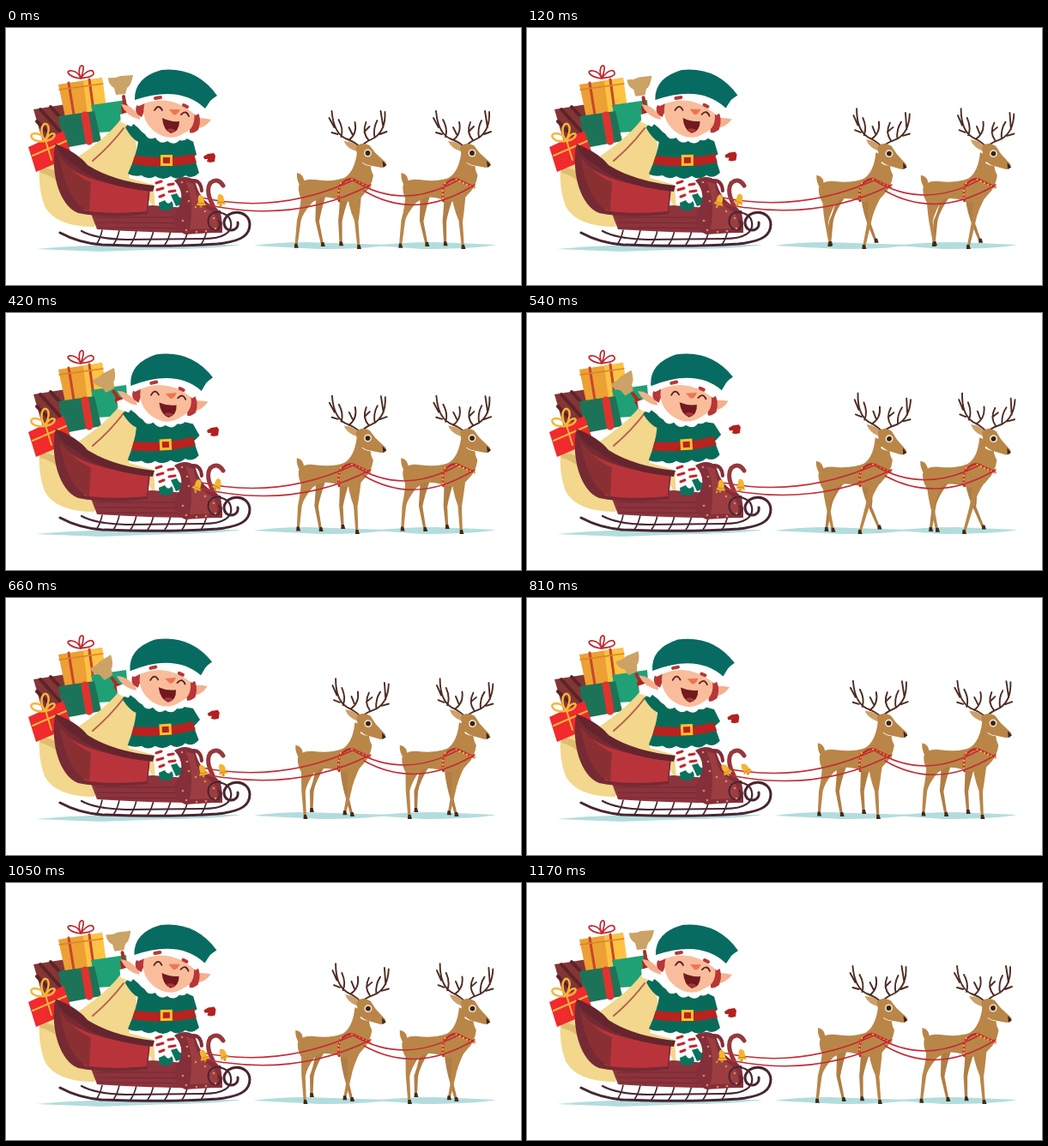
Write an HTML page that moves like this. It is 600 by 300 pixels and loops after 1.2 s.

```html
<!DOCTYPE html>
<html lang="en">
<meta charset="utf-8">
<title>Sleigh ride</title>
<style>
html, body { margin: 0; height: 100%; overflow: hidden; background: #fff; }
svg { display: block; width: 100vw; height: 100vh; }
.line { fill: none; stroke-linecap: round; stroke-linejoin: round; }
</style>
<svg viewBox="0 0 600 300">
  <g fill="#b3dddd">
    <path d="M35 258Q90 253 150 253L274 253Q250 257 190 258L110 261Z"/>
    <path d="M288 254Q315 250 350 250L445 253Q425 258 365 258Z"/>
    <path d="M430 254Q460 250 500 250L571 253Q545 258 485 258Z"/>
  </g>

  <!-- sack and presents -->
  <path fill="#f2d78c" d="M39 160Q37 187 45 208Q58 232 103 232L112 200L62 155Z"/>
  <path fill="#dfbd70" d="M39 163Q55 163 64 172L68 188Q56 172 40 169Z"/>
  <path fill="#843536" d="M32 95L70 89L78 125L43 133Z"/>
  <path class="line" stroke="#5c2427" stroke-width="4" d="M40 95L66 124M52 92L74 116M36 109L56 129"/>
  <path fill="#eda033" d="M61 66L112 58L117 96L69 104Z"/>
  <path fill="#ffc343" d="M90 62L112 58L117 96L95 100Z"/>
  <path class="line" stroke="#c8452c" stroke-width="3" d="M73 64L79 101M97 60L102 96"/>
  <path class="line" stroke="#d98425" stroke-width="1.500" d="M62 72L113 65"/>
  <path class="line" stroke="#c1272d" stroke-width="1.700" d="M87 59C72 57 68 49 77 50C84 51 86 56 87 59C83 48 87 41 90 45C91 50 88 55 87 59C95 47 103 48 102 54C98 59 91 57 87 59"/>
  <path fill="#20a075" d="M99 90L140 84L143 120L106 122Z"/>
  <path fill="#1d7357" d="M61 103L103 97L111 132L68 140Z"/>
  <path class="line" stroke="#e03330" stroke-width="9" d="M92 102L97 132"/>
  <path fill="#f02a2d" d="M26 139L67 120L77 150L35 168Z"/>
  <path class="line" stroke="#f5b63c" stroke-width="2" d="M46 131L53 154M31 149L70 132"/>
  <path class="line" stroke="#f5b63c" stroke-width="2.500" d="M45 132C30 134 25 124 33 123C40 123 44 127 45 132C38 119 43 110 47 112C52 115 49 126 45 132C53 119 60 123 55 128C53 131 49 131 45 132"/>
  <path fill="#f2d78c" d="M80 153Q118 128 134 106L150 118L153 150L143 175L172 183L174 213L164 196Q110 180 80 153Z"/>
  <path class="line" stroke="#b95d4c" stroke-width="2" d="M101 155Q122 137 137 117"/>

  <!-- runners -->
  <g class="line" stroke="#482531" stroke-width="3">
    <path d="M63 239Q85 251 112 253Q190 256 246 252C276 249 284 241 284 229C283 211 256 211 254 227C254 240 272 238 270 227"/>
    <path stroke-width="2.200" d="M88 237Q104 246 140 247L230 246C254 246 264 238 262 227C260 212 236 212 235 227C236 240 252 239 251 228Q248 222 243 226"/>
    <path id="struts" stroke-width="1.600"/>
  </g>

  <!-- sleigh -->
  <path fill="#8d333c" d="M98 214L170 207L250 213L252 239Q180 240 106 235Z"/>
  <path class="line" stroke="#702b35" stroke-width="1.200" d="M105 221L245 221M106 227L250 228M108 233L250 234"/>
  <path fill="#762a34" d="M57 137C52 170 62 207 84 216Q120 223 165 217L168 187Q110 184 82 159Q69 151 57 137Z"/>
  <path fill="#b9343a" d="M69 159Q92 181 166 189L164 214Q120 218 91 213Q84 192 69 159Z"/>
  <path fill="#8a3033" d="M62 150Q82 174 99 180L97 214Q72 206 62 150Z"/>
  <path fill="#65252f" d="M57 135Q83 145 95 160Q125 179 173 184L171 191Q109 185 82 161Q63 151 57 135Z"/>

  <!-- legs -->
  <path class="line" stroke="#fff" stroke-width="6" d="M177 174L182 202M191 174L195 198"/>
  <path class="line" stroke="#c1272d" stroke-width="3" d="M175 181L181 179M176 189L183 187M179 197L184 195M189 183L195 182M190 191L197 190"/>
  <path fill="#08745d" d="M178 204L185 201Q189 208 193 202Q198 210 189 213L179 212ZM192 195L199 193Q203 201 206 197Q209 205 198 208Z"/>

  <g id="ringer">
    <path fill="#cba366" d="M119 58Q127 59 133 56L148 55Q146 67 141 70L139 77L128 78L126 70Q119 66 119 58Z"/>
    <path class="line" stroke="#a33128" stroke-width="4" d="M137 80L139 94"/>
    <path fill="#b3221f" d="M134 90Q139 84 143 92L143 101L135 101Z"/>
  </g>

  <path id="sleeve" fill="#086b59" d="M203 126L218 130L225 144L216 152L203 148Z"/>
  <path id="mitten" fill="#b3211f" d="M-7 -2L-2 -5L5 -6L7 -3L6 4L1 5L-3 4L-2 1L-6 1Z"/>

  <g id="elf">
    <path fill="#086b59" d="M145 109Q156 118 167 128L210 128Q218 145 225 169Q217 177 209 172Q200 179 192 173Q183 179 174 173Q165 178 158 172Q149 174 142 170Q152 148 154 133Q146 129 139 116Z"/>
    <path fill="#b9221f" d="M150 149Q187 154 219 147L222 157Q186 165 147 159Z"/>
    <rect x="181.500" y="149.500" width="11" height="10" fill="#b9221f" stroke="#ffc02e" stroke-width="3"/>
    <path fill="#fff" d="M133 101L146 97L152 108L146 115L134 110ZM151 107Q154 120 162 124Q166 132 174 128Q180 137 188 132Q196 138 202 131Q210 133 213 126Q225 122 224 106Z"/>
    <path fill="#f4b08d" d="M156 104Q146 89 134 89Q140 103 156 107ZM222 105Q232 105 239 107Q231 118 219 117Z"/>
    <path fill="#b93636" d="M155 86Q146 98 158 104L166 87ZM222 96Q229 105 224 119Q217 124 214 122L214 98Z"/>
    <path fill="#f9bd9b" d="M162 86Q190 74 219 97Q222 117 207 123Q190 134 172 120Q156 106 162 86Z"/>
    <path fill="#fff" d="M152 83Q186 63 230 91Q228 99 221 102Q190 74 155 91Q149 90 152 83Z"/>
    <path fill="#086b61" d="M150 84Q149 58 181 49Q222 45 246 79Q241 82 238 85L232 94Q203 66 150 84Z"/>
    <path class="line" stroke="#b93636" stroke-width="4" d="M174 82L180 81M207 90L211 92"/>
    <path class="line" stroke="#5a2325" stroke-width="1.800" d="M173 96Q178 88 182 96M204 101Q210 95 213 103"/>
    <path fill="#ef7552" d="M190 95L203 95Q199 103 195 101Z"/>
    <path fill="#70191f" d="M182 105Q192 110 202 109Q202 121 192 123Q183 119 182 105Z"/>
    <path fill="#a83538" d="M187 119Q192 115 198 120Q193 124 187 119Z"/>
  </g>

  <!-- sleigh front -->
  <path fill="#842f39" d="M196 178Q209 170 220 178Q226 202 242 208Q253 213 252 238L209 241Q190 233 199 213Q211 194 196 178Z"/>
  <path fill="#9c3e41" d="M209 179L219 182Q222 205 238 213Q247 218 246 234L214 235Q220 200 209 179Z"/>
  <path class="line" stroke="#97383b" stroke-width="5" d="M241 207Q232 190 238 181Q247 174 253 184"/>
  <path class="line" stroke="#842c36" stroke-width="4" d="M218 178Q227 178 228 190"/>
  <path class="line" stroke="#482531" stroke-width="2" d="M250 215C239 213 234 221 236 229Q239 237 247 235Q252 230 248 225"/>
  <g id="studs" fill="#dc8a5b"></g>

  <g id="deer">
    <g id="farLegs"></g>
    <g id="torso" fill="#b98648">
      <path d="M347 181Q348 171 339 169Q338 177 343 185Z"/>
      <path d="M341 184Q345 175 360 177Q380 180 394 175Q406 168 409 145L426 152Q423 163 428 172Q426 186 416 195Q409 205 392 202Q376 196 366 198Q352 208 346 203Q340 194 341 184Z"/>
      <path class="line" stroke="#fff" stroke-width="2" d="M416 157Q421 161 428 160"/>
    </g>
    <g id="nearLegs"></g>
    <g id="head">
      <g class="line" stroke="#4d2b22" stroke-width="1.900">
        <path d="M412 138Q405 132 396 129Q382 122 380 97M383 116L377 105M387 124L380 122M391 127Q394 118 388 107M400 131Q410 123 407 110M404 124L400 116"/>
        <path d="M415 137Q421 132 430 128Q443 119 442 98M440 116L437 97M436 124L444 121M430 128Q428 117 433 108M423 131Q415 122 420 110M418 121L424 115"/>
      </g>
      <path fill="#cda06a" d="M411 138Q404 132 394 132Q398 141 409 144Z"/>
      <path fill="#b98648" d="M408 139Q414 132 424 137L431 146L443 157Q445 162 438 163L422 160Q410 157 408 139Z"/>
      <path fill="#382522" d="M439 155L444 160L440 163Z"/>
      <circle cx="422" cy="146" r="4.500" fill="#f4e6c8"/>
      <circle cx="422" cy="146" r="2.900" fill="#332320"/>
    </g>
    <g class="line" stroke="#c4272f" stroke-width="2.500">
      <path d="M390 181Q386 191 388 202M390 183Q400 172 409 179L424 186"/>
      <path stroke="#f0b23e" stroke-width="2.200" stroke-dasharray=".5 4" d="M390 181Q386 191 388 202M403 177L425 187"/>
    </g>
  </g>
  <use href="#deer" x="121.500"/>

  <path id="reins" class="line" stroke="#c32b36" stroke-width="1.500"/>
  <g id="bells"></g>
</svg>
<script>
const $ = id => document.getElementById(id);
const TAU = Math.PI * 2, rad = d => d * Math.PI / 180;
const FRAME = 30, LOOP = 1200, SWING = 1170, STRIDE = 390;

$('struts').setAttribute('d', [112, 132, 152, 172, 192, 212, 234]
  .map(x => `M${x} 236Q${x - 2} 246 ${x - 7} 253`).join(''));

$('studs').innerHTML = [[205, 180], [211, 191], [213, 202], [221, 209], [232, 214],
  [242, 222], [244, 234], [233, 237], [222, 238], [210, 236], [206, 225]]
  .map(([x, y]) => `<circle cx="${x}" cy="${y}" r="1.3"/>`).join('');

// hip x, hip half width, stride centre, reach, phase of the furthest step, knee offset
const farLegs = [[367, 6, 358, 11, 350, -5], [395, 6, 401, 11, 170, -3]];
const nearLegs = [[355, 11, 347.5, 10, 165, -5], [406, 8, 398, 13, 355, 0]];

function leg([hip, width, cx, reach, peak, bend], phase, ground, color) {
  const a = phase - rad(peak);
  const x = cx + reach * Math.cos(a), y = ground - 5 * Math.max(0, -Math.sin(a));
  const knee = (hip + x) / 2 + bend;
  return `<path fill="${color}" d="M${hip - width} 192Q${hip - width} 206 ${knee - 2.5} 225L${x - 1.5} ${y}H${x + 1.5}
    L${knee + 2} 226Q${knee + 4} 214 ${hip + width} 194Z"/>
    <path fill="#40291f" d="M${x - 1.5} ${y - 4}h3l1.500 5h-5Z"/>`;
}

const bell = (x, y, angle) => `<g transform="translate(${x} ${y}) rotate(${angle})">
  <path fill="#f3b531" d="M-2 3Q4 2 4 11L6 15H-5L-3 11Q-4 5 -2 3Z"/>
  <path fill="#c98525" d="M-4 12H5V13H-4Z"/><circle cy="16" r="1.600" fill="#d99428"/></g>`;

function draw(t) {
  const a = TAU * t / SWING, back = (1 - Math.cos(a)) / 2;
  const phase = TAU * t / STRIDE, lift = (1 - Math.cos(phase)) / 2;
  const move = (id, value) => $(id).setAttribute('transform', value);

  move('elf', `translate(0 ${-back}) rotate(${-3.6 * back} 185 175)`);
  move('ringer', `translate(${-7 * back} ${12 * back}) rotate(${-28 * back} 138 95)`);
  move('mitten', `translate(${237 + 5 * back} ${152 - 16 * back})`);
  move('sleeve', `rotate(${12 - 18 * back} 205 132)`);
  $('bells').innerHTML = [[227, 192], [250, 191]].map(([x, y]) => bell(x, y, 30 * Math.sin(a))).join('');

  move('torso', `translate(${-2 * lift} 0) rotate(${-3 * lift} 418 180)`);
  move('head', `translate(-.5 ${lift}) rotate(${7 * lift} 423 151)`);
  $('farLegs').innerHTML = farLegs.map(l => leg(l, phase, 254, '#b07e44')).join('');
  $('nearLegs').innerHTML = nearLegs.map(l => leg(l, phase, 257, '#b98648')).join('');
  const sag = 3 * (1 - lift);
  $('reins').setAttribute('d', `M228 198Q317 ${215 + sag} 404 178M228 205Q335 ${227 + sag} 425 183
    M405 178Q462 ${211 + sag} 526 178M417 190Q478 ${223 + sag} 546 183`);
}

function tick() {
  draw(Math.floor(performance.now() % LOOP / FRAME) * FRAME);
  requestAnimationFrame(tick);
}
tick();
</script>
</html>
```
